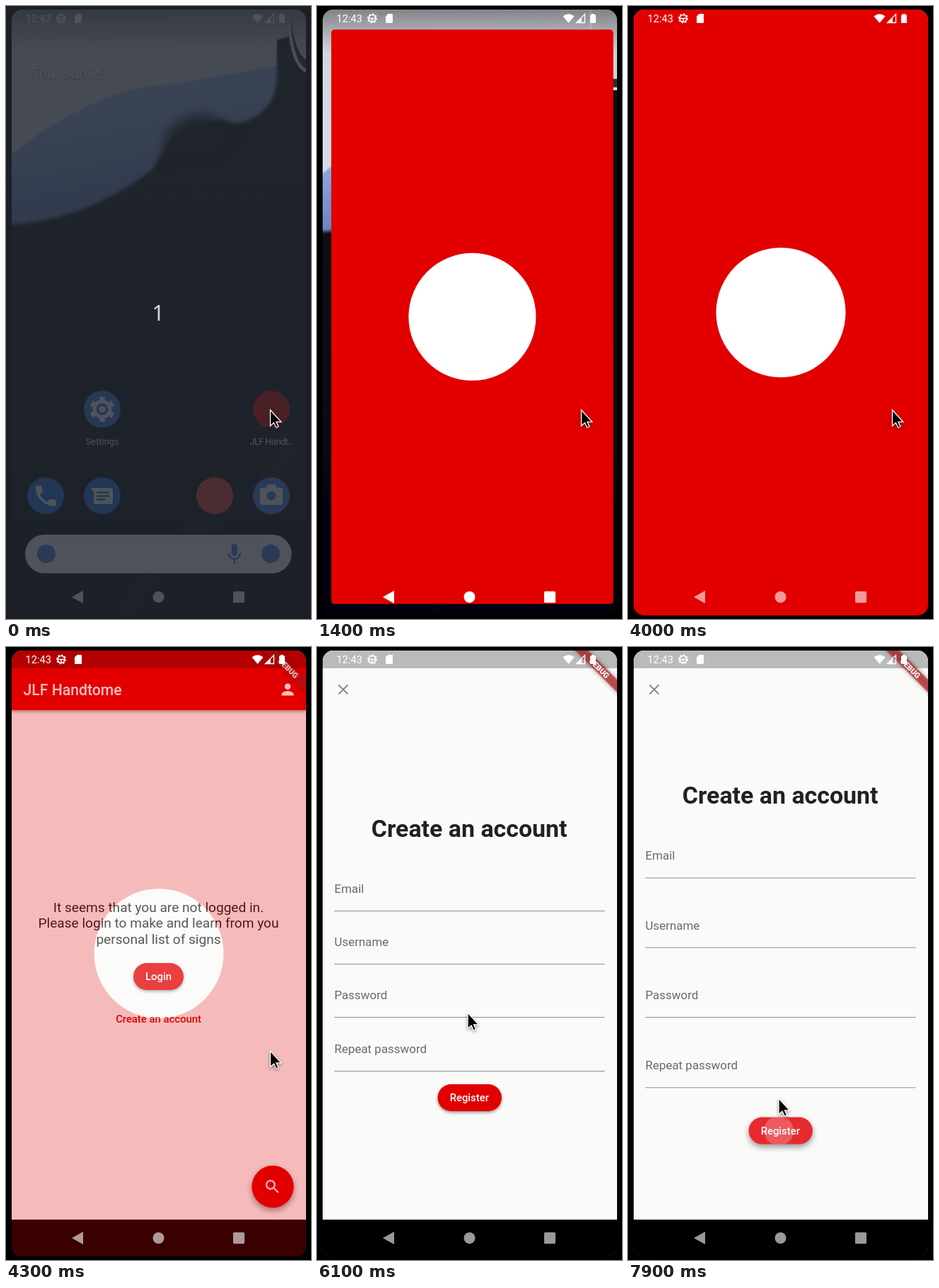
Write an HTML page that moves like this. It is 431 px wide and 865 px high and loops after 8 s.

```html
<!DOCTYPE html>
<html lang="en">
<head>
<meta charset="utf-8">
<title>App sign-up</title>
<style>
html, body { margin: 0; width: 100%; height: 100%; overflow: hidden; background: #000; }
svg { display: block; font-family: Roboto, sans-serif; }
.mid { text-anchor: middle; }
.med { font-weight: 500; }
.bold { font-weight: 700; }
.home text { fill: #fff; filter: drop-shadow(0 1px 1px #0008); }
.lift { filter: drop-shadow(0 2px 2px #0006); }
</style>
</head>
<body>
<svg width="431" height="865" viewBox="0 0 431 865">
  <defs>
    <clipPath id="screen"><rect x="8" y="5" width="416" height="855" rx="15"/></clipPath>
    <clipPath id="pill"><rect x="170.5" y="617" width="90.5" height="38" rx="19"/></clipPath>
    <linearGradient id="night" x2="0" y2="1">
      <stop offset=".3" stop-color="#0d0f15"/><stop offset=".7" stop-color="#0a0b12"/><stop offset=".8" stop-color="#02020f"/>
    </linearGradient>
    <linearGradient id="blue" x2=".35" y2="1">
      <stop offset=".1" stop-color="#a9c0e8"/><stop offset=".6" stop-color="#88a4dc"/><stop offset="1" stop-color="#5f7cba"/>
    </linearGradient>
    <linearGradient id="pale" x2=".3" y2="1">
      <stop stop-color="#cfd2d8"/><stop offset="1" stop-color="#d9deea"/>
    </linearGradient>
    <linearGradient id="scrim" x2="0" y2="1">
      <stop stop-color="#000" stop-opacity=".38"/><stop offset="1" stop-color="#000" stop-opacity="0"/>
    </linearGradient>
    <filter id="soft" x="-50%" y="-50%" width="200%" height="200%"><feGaussianBlur stdDeviation="8"/></filter>
    <filter id="blur"><feGaussianBlur stdDeviation="2.5"/></filter>
    <filter id="edge"><feGaussianBlur stdDeviation="1"/></filter>
  </defs>
  <rect width="431" height="865"/>

  <g clip-path="url(#screen)">
    <g id="wall">
      <rect x="-40" y="-60" width="520" height="990" fill="url(#night)"/>
      <path d="M165 880Q190 790 290 725T410 610" fill="none" stroke="#44445a" stroke-width="9" opacity=".28" filter="url(#soft)"/>
      <path d="M-40 309Q90 317 203 234C222 212 222 194 240 185C275 172 288 156 312 163C335 171 358 155 370 141Q386 120 383 78L200 70-40 190z" fill="url(#blue)" filter="url(#blur)"/>
      <path d="M228 178Q262 142 298 160L322 174 300 205 222 215z" fill="#0d0f15" opacity=".95" filter="url(#soft)"/>
      <path d="M-40 250Q90 130 212 111L232 111 383 84V48L410 40V-60H-40z" fill="url(#pale)" filter="url(#edge)"/>
      <path d="M385 92L384 68Q394 46 416 50V100z" fill="#17161a" filter="url(#blur)"/>
      <path d="M400-60V8C400 55 410 90 428 93H490V-60z" fill="#2a2b30" stroke="#e4e6ea" stroke-width="4.5"/>
      <path d="M402-60V8C403 40 413 76 430 78H490V-60z" fill="#cfd1d6"/>
    </g>
    <rect x="8" y="5" width="416" height="60" fill="url(#scrim)"/>

    <g id="home" class="home">
      <text x="34" y="102" font-size="21.1">Thu, Jun 29</text>
      <g id="dots"></g>
      <g fill="#fff">
        <circle cx="136" cy="569" r="13.5"/>
        <circle cx="136" cy="569" r="14.5" fill="none" stroke="#fff" stroke-width="6.5" pathLength="12" stroke-dasharray="1" stroke-dashoffset="-.5"/>
        <circle cx="136" cy="569" r="8.5" fill="#3b78e7"/>
        <circle cx="136" cy="569" r="4.5"/>
        <path transform="translate(37 672) scale(1.6)" d="M6.62 10.79c1.44 2.83 3.76 5.14 6.59 6.59l2.2-2.2c.27-.27.67-.36 1.02-.24 1.12.37 2.33.57 3.57.57.55 0 1 .45 1 1V20c0 .55-.45 1-1 1-9.39 0-17-7.61-17-17 0-.55.45-1 1-1h3.5c.55 0 1 .45 1 1 0 1.25.2 2.45.57 3.57.11.35.03.74-.25 1.02z"/>
        <path d="M120 680h28q3 0 3 3v17q0 3-3 3h-21q-3 0-3-3v-14z"/>
        <path d="M128 686.5h18M128 691.5h18M128 696.5h12" stroke="#1a73e8" stroke-width="2.3"/>
        <path d="M362 680h5l3-5h10l3 5h5q3 0 3 3v18q0 3-3 3h-26q-3 0-3-3v-18q0-3 3-3z"/>
        <circle cx="375" cy="691" r="6.5" fill="#4285f4"/>
        <rect x="27" y="746" width="376.5" height="54.5" rx="27"/>
      </g>
      <circle cx="57" cy="773" r="13" fill="#4285f4"/>
      <rect x="318.5" y="759" width="8.5" height="17" rx="4.2" fill="#4285f4"/>
      <path d="M314.5 772a8.3 8.3 0 0 0 16.6 0M322.8 781v6" fill="none" stroke="#4285f4" stroke-width="2.6"/>
      <circle cx="374" cy="773" r="13" fill="#4285f4"/>
      <text class="mid" x="136" y="619" font-size="12.9">Settings</text>
      <text class="mid" x="375.5" y="619" font-size="12.9" letter-spacing="-.6">JLF Handt...</text>
    </g>

    <rect id="win" fill="#e20000"/>
    <circle id="mark" fill="#fff"/>

    <g id="app">
      <path d="M8 5h416v803H8z" fill="#fafaf8"/>
      <path d="M8 5h416v84H8z" fill="#e20000" class="lift"/>
      <path d="M8 5h416v25H8z" fill="#a30000"/>
      <text class="med" x="24.5" y="68" font-size="21.2" fill="#fff">JLF Handtome</text>
      <path transform="translate(385.3 47.3) scale(1.06)" fill="#fff" d="M12 12c2.21 0 4-1.79 4-4s-1.79-4-4-4-4 1.79-4 4 1.79 4 4 4zm0 2c-2.67 0-8 1.34-8 4v2h16v-2c0-2.66-5.33-4-8-4z"/>
      <g class="mid" font-size="19.08" fill="#212121">
        <text x="215.5" y="374">It seems that you are not logged in.</text>
        <text x="215.5" y="396.3">Please login to make and learn from you</text>
        <text x="215.5" y="418.6">personal list of signs</text>
      </g>
      <rect class="lift" x="180" y="446" width="71" height="38" rx="19" fill="#e20000"/>
      <rect id="tap" x="147" y="505" width="137" height="39" rx="19.5" fill="#e20000"/>
      <g class="mid med" font-size="14.84">
        <text x="215.5" y="470" fill="#fff">Login</text>
        <text x="215.5" y="529.5" fill="#e20000">Create an account</text>
      </g>
      <circle cx="377" cy="761.5" r="29.7" fill="#e20000" style="filter:drop-shadow(0 4px 4px #0006)"/>
      <path transform="translate(363.8 748.8) scale(1.06)" fill="#fff" d="M15.5 14h-.79l-.28-.27A6.5 6.5 0 1 0 13.73 14.43l.27.28v.79l5 4.99L20.49 19zM9.5 14a4.5 4.5 0 1 1 0-9 4.5 4.5 0 0 1 0 9z"/>
    </g>

    <g id="form">
      <path d="M8 5h416v803H8z" fill="#fafaf8"/>
      <path d="M8 5h416v25H8z" fill="#bababa"/>
      <path d="M30.5 53.5l13 13m0-13l-13 13" stroke="#8c8c8c" stroke-width="2.1"/>
      <text id="head" class="mid bold" x="215.2" y="268" font-size="33.9" fill="#212121">Create an account</text>
      <g id="fields"></g>
      <g id="reg">
        <rect id="regBg" x="170.5" y="617" width="90.5" height="38" rx="19"/>
        <circle id="ripple" cx="213" cy="636" fill="#fff" opacity=".22" clip-path="url(#pill)"/>
        <text class="mid med" x="215.3" y="641" font-size="14.84" fill="#fff">Register</text>
      </g>
    </g>

    <g id="banner" transform="translate(399 30) rotate(45)">
      <rect x="-50" y="-6.4" width="100" height="12.8" fill="#b71c1c" fill-opacity=".66" style="filter:drop-shadow(0 0 3px #0008)"/>
      <text class="mid" y="3.9" font-size="10.8" font-weight="900" fill="#fff">DEBUG</text>
    </g>

    <g fill="#fff">
      <text x="27.5" y="23" font-size="14.6">12:43</text>
      <circle cx="78" cy="17.5" r="5" fill="none" stroke="#fff" stroke-width="1.7"/>
      <circle cx="78" cy="17.5" r="6.4" fill="none" stroke="#fff" stroke-width="1.3" pathLength="16" stroke-dasharray="1"/>
      <path d="M73 17.5h10M78 17.5v5" stroke="#fff" stroke-width="1.5"/>
      <path d="M100.5 11H106q1 0 1 1v11q0 1-1 1h-8q-1 0-1-1v-8.5z"/>
      <path d="M347.5 14.5q8-6.5 16 0L355.5 24z"/>
      <path d="M366.5 23.5h12V11.5zM373 17v6.5" fill="none" stroke="#fff" stroke-width="1.3"/>
      <path d="M366 24h7.5v-7.5z"/>
      <path d="M388 11h4v1.5h2V24h-8V12.5h2z"/>
    </g>

    <path id="navBg" d="M8 808h416v52H8z"/>
    <g id="nav" fill="#fff">
      <path d="M93 834l16-9v18z"/>
      <circle cx="215.5" cy="834" r="8"/>
      <rect x="321" y="826" width="16" height="16" rx="1.5"/>
    </g>
  </g>

  <g id="count">
    <rect width="431" height="865" fill="#242930" opacity=".8"/>
    <text class="mid" x="215" y="443.5" font-size="31" fill="#d6d8da" style="font-family:'Noto Sans',sans-serif">1</text>
  </g>
  <path id="cursor" class="lift" d="M0 0V22.5L5 18 8.2 25 11.5 23.5 8.5 16.8H15.3z" stroke="#fff" stroke-width="1.3"/>
</svg>
<script>
const LOOP = 8000, STEP = 100;
const el = id => document.getElementById(id);
const set = (id, attrs) => { for (const k in attrs) el(id).setAttribute(k, attrs[k]); };
const show = (id, on) => set(id, { visibility: on ? 'visible' : 'hidden' });
const span = (t, a, b) => Math.min(1, Math.max(0, (t - a) / (b - a)));
const mix = (a, b, u) => a + (b - a) * u;
const smooth = u => u * u * (3 - 2 * u);
const shift = dy => `translate(0 ${dy})`;

el('dots').innerHTML = [
  [136, 569, '#3b78e7'], [375, 569, '#e20000'], [56, 691, '#1a73e8'],
  [136, 691, '#1a73e8'], [295, 691, '#ea4335'], [375, 691, '#4285f4']
].map(([x, y, c]) => `<circle cx="${x}" cy="${y}" r="26" fill="${c}"/>`).join('');

el('fields').innerHTML = ['Email', 'Username', 'Password', 'Repeat password'].map((label, i) =>
  `<g><text x="24.5" y="${347 + 75.2 * i}" font-size="16.96" fill="#6a6a69">${label}</text>
   <path d="M24.5 ${Math.round(372 + 75.2 * i) + .5}H406.5" stroke="#8e8e8d"/></g>`).join('');
const fields = [...el('fields').children];

// The window grows out of its icon; each edge settles at its own rate.
function openApp(t) {
  const u = span(t, 900, 1700), out = k => 1 - (1 - u) ** k, p = out(3);
  const left = mix(349, 8, out(3.4)), right = mix(401, 424, out(1.5));
  const top = mix(543, 5, p), bottom = mix(595, 860, out(2.85));
  set('wall', { transform: `translate(215 432) scale(${1 - .074 * p}) translate(-215 -432)` });
  set('home', { opacity: Math.max(0, 1 - 2 * p) });
  set('win', { x: left, y: top, width: right - left, height: bottom - top, rx: 3 + 26 * (1 - p) });
  set('mark', { cx: (left + right) / 2, cy: (top + bottom) / 2, r: Math.min(91.5 * p ** .3, (right - left) / 2) });
  show('win', u > 0);
  show('mark', u > 0);
}

function pressRegister(t) {
  const pressed = t >= 7700, grow = 23.3 * span(t, 7700, 7900);
  set('head', { transform: shift(-2 * grow) });
  fields.forEach((f, i) => f.setAttribute('transform', shift((i - 2) * grow)));
  set('reg', { transform: shift(2 * grow) });
  set('regBg', { fill: pressed ? '#e62a30' : '#e20000' });
  el('regBg').style.filter = `drop-shadow(0 ${pressed ? '4px 4px' : '2px 2px'} #0006)`;
  set('ripple', { r: pressed ? 7 + 14 * span(t, 7700, 7900) : 0 });
}

function moveCursor(t) {
  const a = smooth(span(t, 4700, 5300)), b = smooth(span(t, 6800, 7400));
  const x = mix(373.5, 213, a) - 10 * Math.sin(2 * Math.PI * b);
  const y = mix(570, 516, a) + 121 * b;
  set('cursor', { transform: `translate(${x} ${y})` });
}

function draw(now) {
  const t = Math.floor(now % LOOP / STEP) * STEP;
  const fade = span(t, 4000, 4400);
  openApp(t);
  pressRegister(t);
  moveCursor(t);
  show('count', t < 100);
  show('form', t >= 6100);
  show('ripple', t >= 7700);
  set('app', { opacity: fade });
  set('banner', { opacity: fade });
  set('navBg', { opacity: fade });
  set('nav', { opacity: 1 - .4 * span(t, 1700, 3200) });
  set('tap', { opacity: .12 * span(t, 5600, 5800) });
  requestAnimationFrame(draw);
}
requestAnimationFrame(draw);
</script>
</body>
</html>
```
